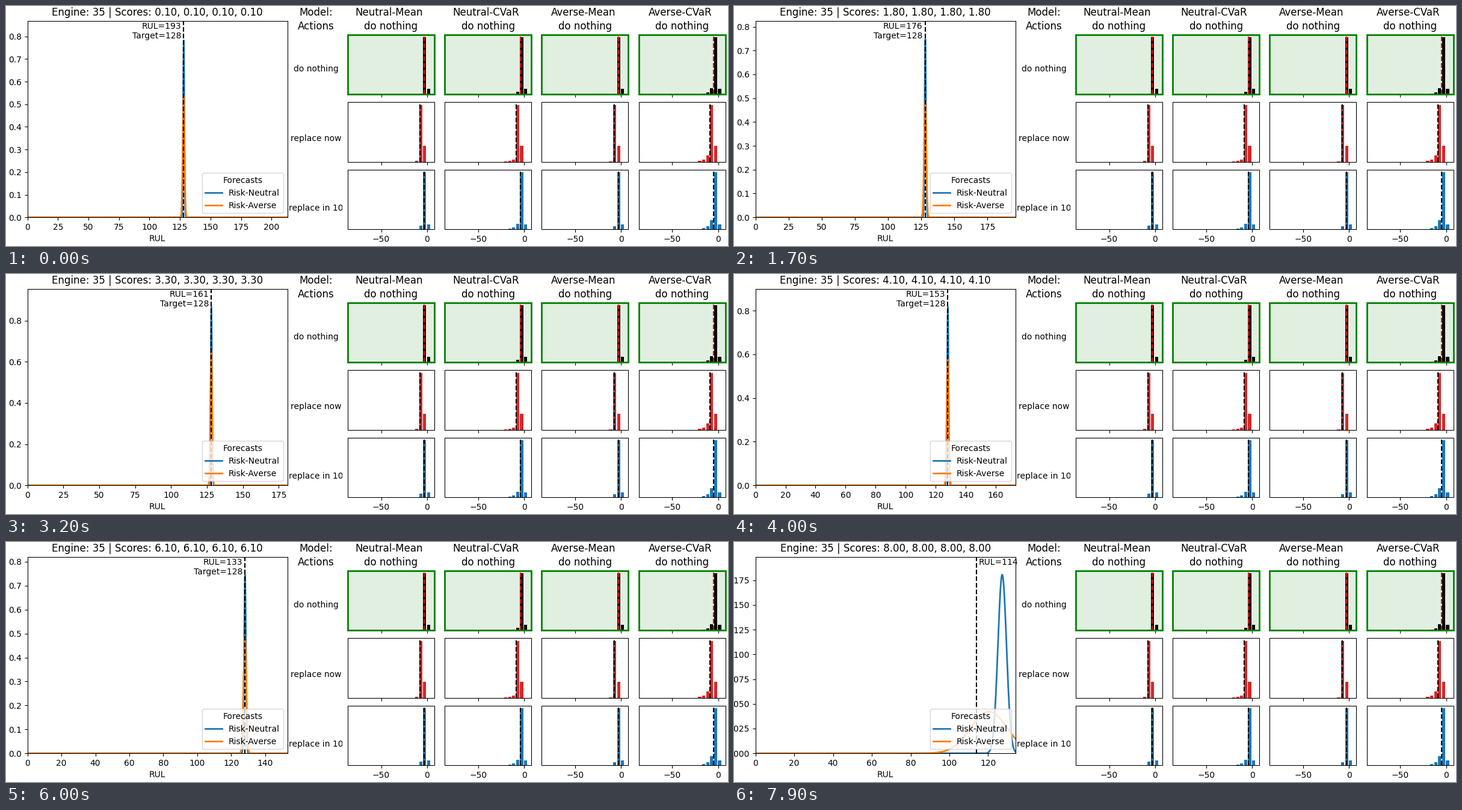
Write a matplotlib script that moves like this. It is 1200x400 px and loops after 8000 ms.

```python
import numpy as np
import matplotlib.pyplot as plt
from matplotlib.animation import FuncAnimation
from matplotlib.patches import Rectangle
from matplotlib.transforms import Bbox

W, H, DPI = 1200, 400, 100
FRAMES, INTERVAL = 80, 100
START_RUL, CAP = 193, 128

plt.rcParams["font.family"] = "DejaVu Sans"
fig = plt.figure(figsize=(W / DPI, H / DPI), dpi=DPI, facecolor="white")

# Panels on the right, laid out in pixels with y pointing down
board = fig.add_axes([0, 0, 1, 1], zorder=-1)
board.set(xlim=(0, W), ylim=(H, 0))
board.axis("off")

LEFT, TOP, COL_STEP, ROW_STEP = 568, 47.6, 161.2, 112.5
PANEL_W, PANEL_H = 144, 99.6
BAR_W, BIN, MAIN_H = 5.3, 6.6, 94.9
ZERO, UNIT = 132, 1.53

# name, weight of the lower tail, bins in that tail
MODELS = [("Neutral-Mean", 1.5, 1), ("Neutral-CVaR", 4.2, 3),
          ("Averse-Mean", 0.3, 1), ("Averse-CVaR", 10.5, 3)]
# name, bar colour, mean colour, bin shift, upper bar height, extra tail
ACTIONS = [("do nothing", "black", "red", 0, 9.5, 0),
           ("replace now", "tab:red", "black", -1, 26.5, 0),
           ("replace in 10", "tab:blue", "black", 0, 8.5, 5)]


def label(x, y, text, size=10, va="baseline"):
    return board.text(x, y, text, fontsize=size, ha="center", va=va)


def panel(row, col):
    _, tail, bins = MODELS[col]
    _, color, mean_color, shift, upper, extra = ACTIONS[row]
    left, top = LEFT + col * COL_STEP, TOP + row * ROW_STEP
    bottom = top + PANEL_H
    chosen = row == 0
    box = (left, top), PANEL_W, PANEL_H
    if chosen:
        board.add_patch(Rectangle(*box, fc="green", alpha=0.12, lw=0))

    center = left + 127.8 + shift * BIN
    bars = {0: MAIN_H, 1: upper}
    for k in range(bins):
        bars[-1 - k] = (tail + extra) * 0.35 ** k
    for k, h in bars.items():
        corner = (center + k * BIN - BAR_W / 2, bottom - h)
        board.add_patch(Rectangle(corner, BAR_W, h, fc=color, lw=0))

    mean = center - np.sqrt(tail)
    board.plot([mean, mean], [bottom, top], "--", color=mean_color, lw=1.5)
    for value in (-50, 0):
        x = left + ZERO + value * UNIT
        board.plot([x, x], [bottom, bottom + 4.9], color="black", lw=0.8,
                   solid_capstyle="butt")
        if row == 2:
            label(x, bottom + 9.7, f"{value}".replace("-", "\u2212"), va="top")
    board.add_patch(Rectangle(*box, fill=False, zorder=3,
                              ec="green" if chosen else "black",
                              lw=2 if chosen else 0.8))


for row in range(3):
    for col in range(4):
        panel(row, col)

label(515.5, 16, "Model:", 12)
label(515.5, 39, "Actions", 12)
for col, (model, *_) in enumerate(MODELS):
    middle = LEFT + col * COL_STEP + PANEL_W / 2
    label(middle - 3.2, 16, model, 12)
    label(middle, 39, "do nothing", 12)
for row, (action, *_) in enumerate(ACTIONS):
    text = label(515, 104.5 + 116 * row, action, va="center")
    text.set_clip_box(Bbox([[470, 0], [559, H]]))
    text.set_clip_on(True)

# Forecast plot on the left
ax = fig.add_axes([35.6 / W, 1 - 352.2 / H, 432 / W, 327.5 / H])
neutral, = ax.plot([], [], color="tab:blue", lw=2, label="Risk-Neutral")
averse, = ax.plot([], [], color="tab:orange", lw=2, label="Risk-Averse")
marker = ax.axvline(CAP, color="black", ls="--", lw=1.5)
ax.set_xlabel("RUL")
title = ax.set_title("")
ax.legend(title="Forecasts", loc="lower right")
note = ax.annotate("", (CAP, 0.99), xycoords=("data", "axes fraction"),
                   xytext=(0, 0), textcoords="offset pixels", va="top",
                   annotation_clip=False)


def bell(x, mean, sigma):
    peak = 1 / (sigma * np.sqrt(2 * np.pi))
    return peak * np.exp(-0.5 * ((x - mean) / sigma) ** 2)


def forecasts(i):
    """Mean and spread of both forecasts: a slow wobble, then a late widening."""
    wobble = np.sin(0.147 * i)
    late = 1.74 * np.exp(0.315 * (i - 79))
    early = 9 / (1 + np.exp(-0.6 * (i - 72.5)))
    return ((128.1 - 0.5 * late, 0.505 + 0.045 * wobble + late),
            (128 - 0.87 * early, 0.74 + 0.13 * wobble + early))


def update(i):
    rul = START_RUL - i
    target = min(rul, CAP)
    x = np.linspace(0, rul + 20, 1500)
    sharp, wide = forecasts(i)
    neutral.set_data(x, bell(x, *sharp))
    averse.set_data(x, bell(x, *wide))
    ax.set_xlim(0, rul + 20)
    ax.set_ylim(0, 1.1 * bell(sharp[0], *sharp))
    marker.set_xdata([target, target])

    capped = rul > CAP
    note.xy = (target, 0.993)
    note.set_text(f"RUL={rul}\nTarget={CAP}" if capped else f"RUL={rul}")
    note.set_ha("right" if capped else "left")
    note.set_position((-4 if capped else 4, 0))

    score = f"{(i + 1) / 10:.2f}"
    title.set_text("Engine: 35 | Scores: " + ", ".join([score] * 4))
    return neutral, averse, marker, note, title


anim = FuncAnimation(fig, update, frames=FRAMES, interval=INTERVAL,
                     repeat=True, repeat_delay=0, blit=False)
plt.show()
```
